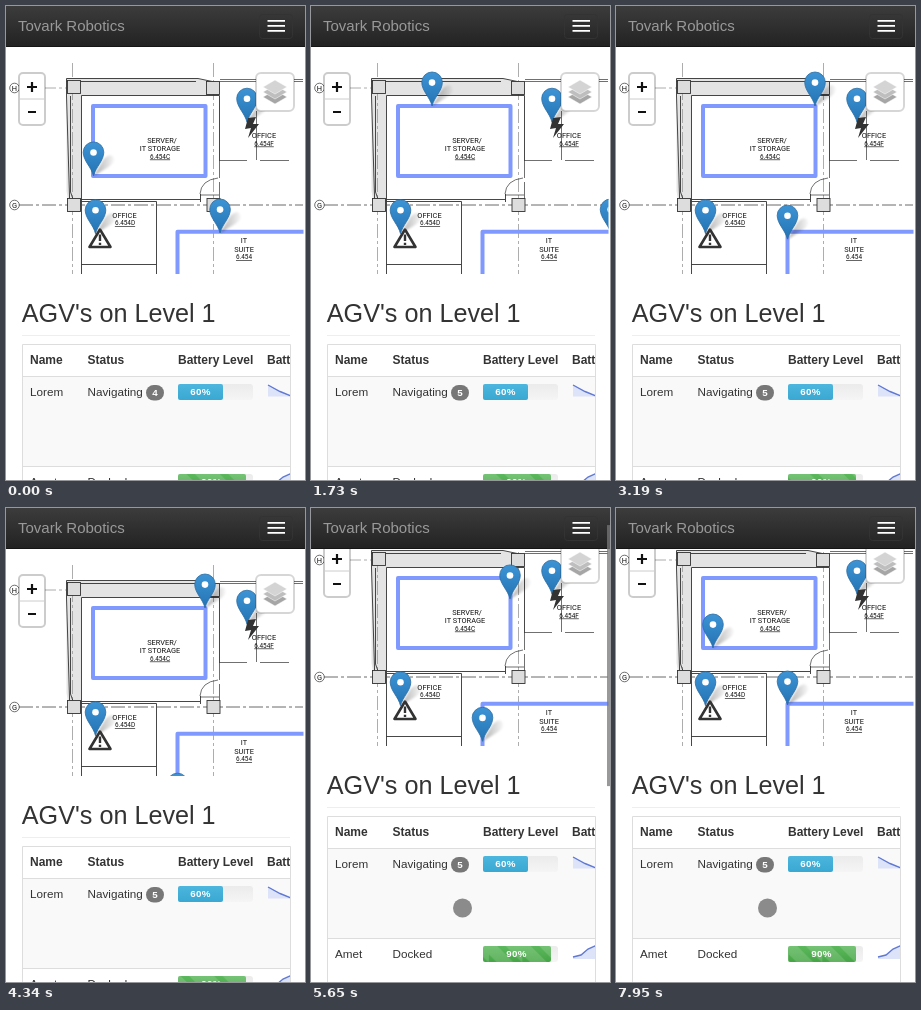
An HTML page for the animation above (8000 ms loop, 299 by 474 pixels).

```html
<!DOCTYPE html>
<html lang="en">
<head>
<meta charset="utf-8">
<title>AGV overview</title>
<style>
  html, body { margin: 0; height: 100%; overflow: hidden; background: #fff; }
  svg { display: block; width: 100%; height: 100%; font-family: "Liberation Sans", Arial, sans-serif; }
  .cell { font-size: 11.7px; fill: #333; }
  .bold { font-size: 12px; font-weight: bold; }
  .small { font-size: 9.8px; font-weight: bold; letter-spacing: .3px; fill: #fff; text-anchor: middle; }
  .room { font: 7.4px Roboto, sans-serif; fill: #111; text-anchor: middle; }
  .number { font-size: 6.4px; text-decoration: underline; }
  .wall { fill: none; stroke: #333; stroke-width: .9; }
  .axis { fill: none; stroke: #999; stroke-width: .8; stroke-dasharray: 14 3 3 3; }
  .route { fill: none; stroke: #7f99ff; stroke-width: 4; stroke-linejoin: round; }
  .rule { stroke: #ddd; }
  .trend { fill: none; stroke: #6079d4; stroke-width: 1.4; }
</style>
</head>
<body>
<svg viewBox="0 0 299 474">
  <defs>
    <linearGradient id="navFill" x2="0" y2="1"><stop stop-color="#3c3c3c"/><stop offset="1" stop-color="#222"/></linearGradient>
    <linearGradient id="pinFill" x2="0" y2="1"><stop stop-color="#3d94d5"/><stop offset="1" stop-color="#2473b3"/></linearGradient>
    <linearGradient id="infoFill" x2="0" y2="1"><stop stop-color="#4cb6de"/><stop offset="1" stop-color="#39a8d2"/></linearGradient>
    <linearGradient id="okFill" x2="0" y2="1"><stop stop-color="#5cb85c"/><stop offset="1" stop-color="#46a546"/></linearGradient>
    <linearGradient id="trackFill" x2="0" y2="1"><stop stop-color="#ebebeb"/><stop offset="1" stop-color="#f5f5f5"/></linearGradient>
    <linearGradient id="shade"><stop stop-color="#000" stop-opacity=".32"/><stop offset="1" stop-color="#000" stop-opacity=".03"/></linearGradient>
    <pattern id="stripes" width="33.5" height="33.5" patternUnits="userSpaceOnUse">
      <path d="M0 0H8.4L33.5 25.1V33.5H25.1L0 8.4ZM16.8 0H33.5V16.8ZM0 16.8L16.8 33.5H0Z" fill="#fff" fill-opacity=".15"/>
    </pattern>
    <clipPath id="mapClip"><rect y="57" width="297.5" height="211"/></clipPath>
    <clipPath id="tableClip"><rect x="16" y="338" width="268.5" height="200"/></clipPath>
    <filter id="soft" x="-30%" y="-30%" width="160%" height="160%"><feGaussianBlur stdDeviation=".8"/></filter>
    <g id="pin">
      <path d="M0 24L10 7Q17 0 20 5T13 16Z" fill="url(#shade)" filter="url(#soft)"/>
      <path d="M0 23.7C-2 15-10.3 8.5-10.3 0A10.3 10.3 0 0 1 10.3 0C10.3 8.5 2 15 0 23.7Z" fill="url(#pinFill)" stroke="#2b6ca3" stroke-width=".8"/>
      <circle r="3.3" cy=".3" fill="#fff"/>
    </g>
    <rect id="column" width="13" height="13" fill="#ddd" stroke="#333" stroke-width=".9"/>
  </defs>

  <rect width="299" height="474" fill="#fff"/>
  <g id="page">
    <g clip-path="url(#mapClip)">
      <path d="M60.5 72.5H192L213.500 77V89.500H75.500V193L75 206H64L60.500 185Z" fill="#e4e4e4"/>
      <path class="axis" d="M66.500 57V268M207.500 57V268M13 82H60"/>
      <path class="axis" d="M13 199H297" style="stroke:#444"/>
      <g class="wall">
        <path d="M60.500 72.500H192L213.500 77M60.500 75.500H190M75.500 89.500H213.500V155M60.500 72.500V90L63.500 190V206M64.500 90V186L67 193M75.500 89.500V268"/>
        <path d="M75.500 193.500H194M75.500 195.500H150.500V268M75.500 258.500H150M194.500 196V188"/>
        <path d="M213.500 155V172M194 188Q195 174 212 172M194 189H213M213.500 176V193M214 73.500H297M214 75.500H297" stroke-width=".7"/>
        <path d="M213.500 154.500H241M254 154.500H283M250.500 105V154" stroke-width=".7"/>
        <circle cx="8.500" cy="82" r="4.800" stroke-width=".7"/>
        <circle cx="8.500" cy="199" r="4.800" stroke-width=".7"/>
      </g>
      <use href="#column" x="61.500" y="74.500"/>
      <use href="#column" x="200.500" y="75.500"/>
      <use href="#column" x="61.500" y="192.500"/>
      <use href="#column" x="201" y="192.500"/>
      <g id="rooms" class="room"></g>
      <path class="route" d="M87 100H199.500V170H87Z"/>
      <path class="route" d="M171.500 330V225.700H310"/>
      <use href="#pin" x="241" y="92.500"/>
      <use id="agvA" href="#pin"/>
      <use href="#pin" x="89.500" y="204"/>
      <use id="agvB" href="#pin"/>
      <path d="M242 112L250 111 247 118 253 118 242 132 245 122 239 123Z" fill="#333"/>
      <path d="M94 223.500L104.500 241H83.500Z" fill="#fff" fill-opacity=".5" stroke="#333" stroke-width="2.600" stroke-linejoin="round"/>
      <path d="M94 228.500V235M94 236.700V239" stroke="#333" stroke-width="2.400"/>

      <rect x="13" y="67" width="26" height="52" rx="4" fill="#fff" stroke="#000" stroke-opacity=".2" stroke-width="2"/>
      <path d="M14 93H38" stroke="#ccc"/>
      <path d="M21 81H31M26 76V86M22 106H30" stroke="#111" stroke-width="2.200"/>
      <rect x="250" y="67" width="38" height="38" rx="5" fill="#fff" stroke="#000" stroke-opacity=".16" stroke-width="2"/>
      <g stroke="#fff" stroke-width=".5">
        <path d="M257 91L269 84 281 91 269 98Z" fill="#a6a6a6"/>
        <path d="M257 86L269 79 281 86 269 93Z" fill="#bebebe"/>
        <path d="M257 81L269 74 281 81 269 88Z" fill="#d4d4d4"/>
      </g>
    </g>

    <text x="15.800" y="316" font-size="25.200" fill="#333">AGV's on Level 1</text>
    <path d="M16 329.500H284" stroke="#eee"/>

    <g clip-path="url(#tableClip)">
      <rect x="16" y="371" width="269" height="89" fill="#f9f9f9"/>
      <path class="rule" d="M16 370.500H284M16 460.500H284"/>
      <g class="cell bold">
        <text x="24" y="358">Name</text><text x="81.500" y="358">Status</text>
        <text x="172" y="358">Battery Level</text><text x="261" y="358">Battery</text>
      </g>
      <g class="cell">
        <text x="24" y="390">Lorem</text><text x="81.500" y="390">Navigating</text>
        <text x="24" y="480">Amet</text><text x="81.500" y="480">Docked</text>
      </g>
      <rect x="140" y="379" width="18" height="15.500" rx="7.750" fill="#777"/>
      <text id="badge" class="small" x="149" y="390.300"></text>

      <rect x="172" y="378" width="75" height="16" rx="3" fill="url(#trackFill)"/>
      <rect x="172" y="378" width="45" height="16" rx="2" fill="url(#infoFill)"/>
      <text class="small" x="194.500" y="389.300">60%</text>
      <rect x="172" y="468" width="75" height="16" rx="3" fill="url(#trackFill)"/>
      <rect x="172" y="468" width="68" height="16" rx="2" fill="url(#okFill)"/>
      <rect x="172" y="468" width="68" height="16" rx="2" fill="url(#stripes)"/>
      <text class="small" x="205.500" y="479.300">90%</text>

      <path d="M262 379L274 385.500 286 390.500H262Z" fill="#dde4fa"/>
      <path class="trend" d="M262 379L274 385.500 286 390.500"/>
      <path d="M262 479L270 477 277 471 286 467V481H262Z" fill="#dde4fa"/>
      <path class="trend" d="M262 479L270 477 277 471 286 467"/>
    </g>
    <path class="rule" d="M16.500 540V338.500H284.500V540" fill="none"/>
  </g>

  <rect width="299" height="41" fill="url(#navFill)"/>
  <path d="M0 40.500H299" stroke="#151515"/>
  <text x="12" y="25" font-size="15" fill="#999">Tovark Robotics</text>
  <rect x="253.500" y="8.500" width="33" height="24" rx="3" fill="none" stroke="#333"/>
  <path d="M261.500 14.800H279M261.500 19.800H279M261.500 24.800H279" stroke="#fff" stroke-width="1.800"/>
  <rect id="thumb" x="296" width="3" height="261" fill="#777" fill-opacity=".75"/>
  <circle id="touch" r="9.500" fill="#8b8b8b"/>
</svg>
<script>
  const LOOP = 8000;
  const el = id => document.getElementById(id);

  // Marker routes: [time in ms, x, y] of the pin head, linear between stops.
  const routeA = [
    [0, 87.5, 146.3], [810, 87.5, 100.3], [1220, 87.5, 76.3], [1730, 121, 76.3],
    [3160, 199, 76.3], [5060, 199, 76.3], [7040, 199, 146.3], [LOOP, 91.5, 146.3]
  ];
  const routeB = [
    [0, 214, 203.3], [810, 260.5, 203.3], [1730, 299.5, 203.3], [2050, 312, 203.3],
    [2300, 308, 203.3], [2500, 274, 203.3], [3108, 171.5, 203.3], [4130, 171.5, 279],
    [4340, 171.5, 275.5], [5030, 171.5, 255.5], [7070, 171.5, 203.3], [LOOP, 171.5, 203.3]
  ];
  const drag = { press: 4960, start: 5020, end: 5430, distance: 30 };

  const progress = (t, from, to) => Math.min(1, Math.max(0, (t - from) / (to - from)));

  function along(route, t) {
    const i = route.findIndex(stop => stop[0] > t);
    const [t0, x0, y0] = route[i - 1], [t1, x1, y1] = route[i];
    const p = progress(t, t0, t1);
    return [x0 + (x1 - x0) * p, y0 + (y1 - y0) * p];
  }

  function place(node, [x, y]) {
    node.setAttribute('transform', `translate(${x} ${y})`);
  }

  function label(x, y, text, type = '') {
    el('rooms').insertAdjacentHTML('beforeend', `<text x="${x}" y="${y}" class="${type}">${text}</text>`);
  }

  label(156, 136.5, 'SERVER/');
  label(154, 144.8, 'IT STORAGE');
  label(258, 131.5, 'OFFICE');
  label(118.5, 211.5, 'OFFICE');
  label(238, 236.8, 'IT');
  label(238, 245.5, 'SUITE');
  label(154, 152.5, '6.454C', 'number');
  label(258, 139.5, '6.454F', 'number');
  label(119, 219, '6.454D', 'number');
  label(238, 253, '6.454', 'number');
  label(8.5, 84.5, 'H');
  label(8.5, 201.5, 'G');

  function draw(t) {
    const pull = progress(t, drag.start, drag.end);
    const scroll = Math.round(pull * drag.distance);
    place(el('page'), [0, -scroll]);
    place(el('agvA'), along(routeA, t));
    place(el('agvB'), along(routeB, t));
    place(el('touch'), [145.5 + 6 * pull, 430 - scroll]);
    el('touch').setAttribute('opacity', t >= drag.press ? 1 : 0);
    el('thumb').setAttribute('y', scroll * 0.57);
    el('thumb').setAttribute('opacity', scroll ? 1 - progress(t, 7000, 7250) : 0);
    el('badge').textContent = t < 1220 ? 4 : 5;
    el('stripes').setAttribute('patternTransform', `translate(${172 - t / 2000 * 33.5} 468)`);
  }

  const begin = performance.now();
  function tick() {
    draw((performance.now() - begin) % LOOP);
    requestAnimationFrame(tick);
  }
  tick();
</script>
</body>
</html>
```
